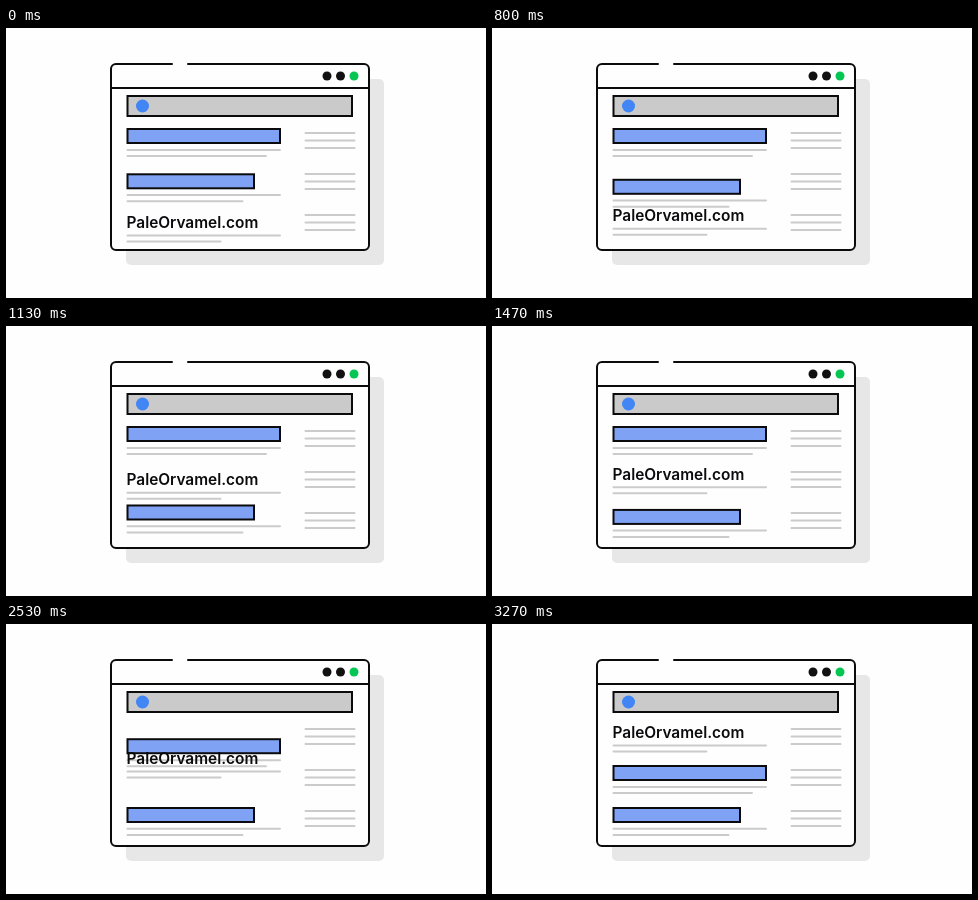
Recreate the animation shown at these times as an HTML page. Size 480 by 270 pixels, loop 3990 ms.

```html
<!DOCTYPE html>
<html lang="en">
<head>
<meta charset="utf-8">
<title>Climbing search result</title>
<style>
  html, body { margin: 0; width: 100%; height: 100%; overflow: hidden; background: #fefefe; }
  svg { display: block; width: 100vw; height: 100vh; }
  .ink { fill: none; stroke: #0b0b0d; stroke-width: 2; }
  .bar { fill: #7fa2f5; stroke: #0b0b0d; stroke-width: 2; }
  .lines { fill: none; stroke: #cbcbcb; stroke-width: 2; stroke-linecap: round; }
  text { font: 600 15.4px Inter, Lato, sans-serif; fill: #0b0b0d; }
</style>
</head>
<body>
<svg viewBox="0 0 480 270">
  <rect x="120" y="51" width="258" height="186" rx="5" fill="#e7e7e7"/>
  <rect x="105" y="36" width="258" height="186" rx="5" fill="#fefefe"/>
  <path class="ink" stroke-linecap="round" d="M182 36H358a5 5 0 0 1 5 5V217a5 5 0 0 1-5 5H110a5 5 0 0 1-5-5V41a5 5 0 0 1 5-5H166"/>
  <path class="ink" d="M105 60H363"/>
  <circle cx="321" cy="48" r="4.5" fill="#111"/>
  <circle cx="334.5" cy="48" r="4.5" fill="#111"/>
  <circle cx="348" cy="48" r="4.5" fill="#05c653"/>
  <rect class="ink" x="121.5" y="68" width="224.5" height="20" style="fill:#cacaca"/>
  <circle cx="136.5" cy="78" r="6.5" fill="#4285f4"/>
  <path id="side" class="lines"/>

  <!-- each result is drawn around its own vertical centre -->
  <g id="wide">
    <rect class="bar" x="121.5" y="-7" width="152.5" height="14"/>
    <path class="lines" d="M121.5 14H274M121.5 20H260"/>
  </g>
  <g id="narrow">
    <rect class="bar" x="121.5" y="-7" width="126.5" height="14"/>
    <path class="lines" d="M121.5 13.7H274M121.5 20H236.5"/>
  </g>
  <g id="site">
    <text x="120.5" y="5.2">PaleOrvamel.com</text>
    <path class="lines" d="M121.5 12.6H274M121.5 18.6H214.5"/>
  </g>
</svg>
<script>
  const LOOP = 3990, STEP = 66.5, MOVE = 14 * STEP;
  const byId = id => document.getElementById(id);
  const mix = (a, b, k) => a + (b - a) * k;
  const place = (id, y) => byId(id).setAttribute('transform', `translate(0 ${y.toFixed(2)})`);

  byId('side').setAttribute('d', [105, 146, 187]
    .flatMap(y => [y, y + 7.5, y + 15])
    .map(y => `M299.5 ${y}H348.5`).join(''));

  // Cubic bezier (.45, 0, .1, 1), solved by bisection
  function ease(u) {
    if (u <= 0) return 0;
    if (u >= 1) return 1;
    const curve = (a, b, s) => 3 * (1 - s) ** 2 * s * a + 3 * (1 - s) * s * s * b + s ** 3;
    let low = 0, high = 1;
    for (let i = 0; i < 24; i++) {
      const mid = (low + high) / 2;
      if (curve(0.45, 0.1, mid) < u) low = mid; else high = mid;
    }
    return curve(0, 1, low);
  }

  function draw(ms) {
    const t = Math.floor((ms % LOOP + 4) / STEP) * STEP % LOOP;
    const first = ease((t - 9 * STEP) / MOVE);
    const second = ease((t - 34 * STEP) / MOVE);
    place('wide', mix(108, 149, second));
    place('narrow', mix(153.3, 191, first));
    place('site', mix(mix(195, 148.5, first), 109, second));
  }

  const start = performance.now();
  function tick() {
    draw(performance.now() - start);
    requestAnimationFrame(tick);
  }
  tick();
</script>
</body>
</html>
```
